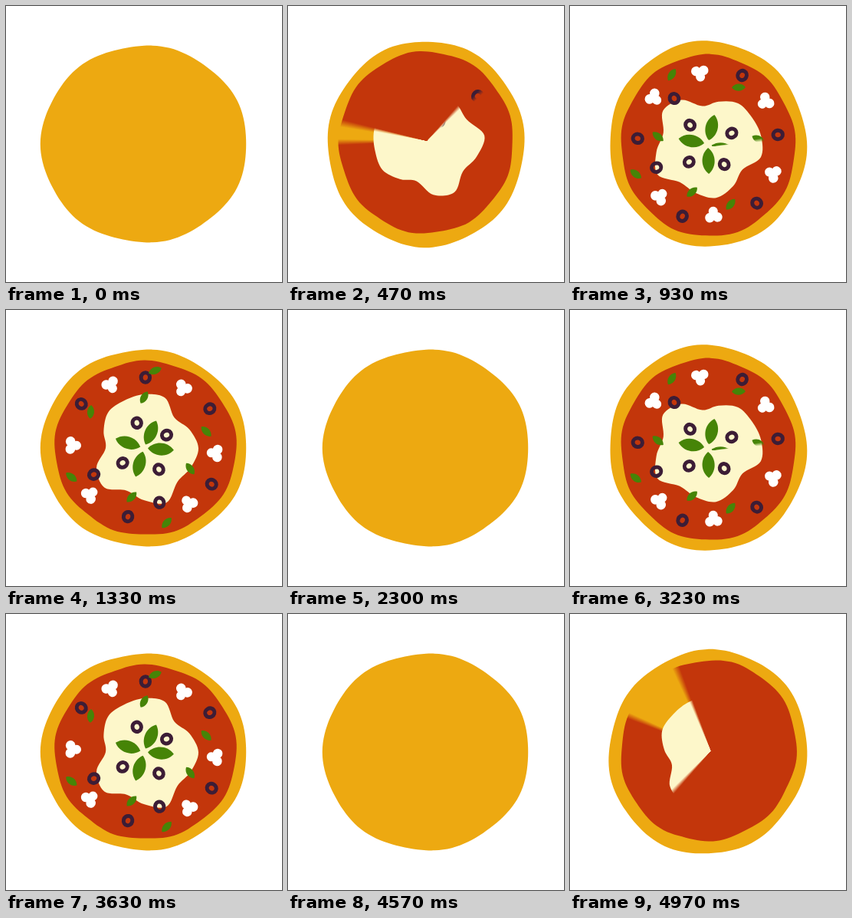
Write an HTML page that moves like this. It is 360x360 px and loops after 5000 ms.

```html
<!DOCTYPE html>
<html lang="en">
<head>
<meta charset="utf-8">
<title>Pizza</title>
<style>
  html, body { margin: 0; width: 100%; height: 100%; overflow: hidden; background: #fff; }
  svg { position: absolute; left: 0; top: 0; width: 360px; height: 360px; }
</style>
</head>
<body>
<script>
const { PI, sin, cos, exp, min, max, floor } = Math;

// Smooth closed shape around the centre, from evenly spaced radii
function blob(radii, fill) {
  const n = radii.length;
  const at = i => {
    const a = 2 * PI * i / n, r = radii[(i + n) % n];
    return [r * cos(a), r * sin(a)];
  };
  let d = `M${at(0)}`;
  for (let i = 0; i < n; i++) {
    const [a, b, c, e] = [-1, 0, 1, 2].map(k => at(i + k));
    d += `C${b.map((v, k) => v + (c[k] - a[k]) / 6)} ${c.map((v, k) => v - (e[k] - b[k]) / 6)} ${c}`;
  }
  return `<path d="${d}Z" fill="${fill}"/>`;
}

const wavy = radius => Array.from({ length: 72 }, (_, i) => radius(i * PI / 36));

// Repeats a topping at the given angles, turned to face outwards plus a tilt
const ring = (radius, angles, body, tilt = 0) => angles.map(a =>
  `<g transform="rotate(${a}) translate(${radius}) rotate(${tilt})">${body}</g>`).join('');

function leaf(length, width) {
  const l = length / 2, w = width * 0.67;
  return `<path d="M${-l} 0C${-l / 2} ${-w} ${l / 2} ${-w} ${l} 0C${l / 2} ${w} ${-l / 2} ${w} ${-l} 0Z" fill="#468407"/>`;
}

const olive = '<ellipse rx="6.2" ry="5.7" fill="none" stroke="#3c1d36" stroke-width="5"/>';
const mushroom = '<g fill="#fff"><circle cx="3" cy="-5" r="6.3"/><circle cx="3" cy="5" r="6.3"/><circle cx="-5" r="6"/></g>';
const sprig = leaf(18, 9);

const crust = blob(wavy(a => 131.2 + 3 * cos(2 * a) - cos(7 * a)), '#eda911');
const sauce = blob(wavy(a => 116 + 2 * cos(a) + 2.5 * cos(2 * a) - sin(9 * a)), '#c3360b');
const cheese = blob([71, 66, 62, 77, 68, 60, 73, 67, 50, 57, 66, 67, 70, 71, 56, 64], '#fdf7ca');
const olives = ring(34, [-106, -30, 55, 145], olive) + ring(74, [74, 152], olive)
  + ring(92, [-89, 103], olive) + ring(100, [-145, -31, 28], olive);
const mushrooms = ring(93, [-118, -57, 4, 51, 139, 182], mushroom);
const basil = ring(22, [-66, 4, 106, 198], leaf(34, 16)) + ring(66, [-90, 24, 104], sprig, 30)
  + ring(84, [-146, -15], sprig, 60) + ring(102, [-82, 73, 158], sprig, 60);

const layers = [crust, sauce, cheese, olives, mushrooms, basil].map(body => {
  document.body.insertAdjacentHTML('beforeend', `<svg viewBox="-180 -180 360 360">${body}</svg>`);
  return document.body.lastElementChild;
});

const clamp = v => min(1, max(0, v));
const STAGGER = 133;

// One full turn, eased in and out
const spin = t => 180 * (1 - cos(PI * clamp((t - 30) / 1320)));
// Degrees uncovered: a quick start and a long settle
const sweep = t => 360 * (1 - exp(-((max(0, t - 185) / 142) ** 1.75)));

// Soft-edged wedge, opened counterclockwise from the top
function wedge(open) {
  const gap = 360 - open;
  if (gap < 0.05) return 'none';
  const seam = clamp(1 - gap / 12);
  return `conic-gradient(at 184px 180px, #0000 ${gap - 5}deg, #000 ${gap}deg, #000 356deg, rgba(0,0,0,${seam}) 360deg)`;
}

function draw(ms) {
  // 30 pictures a second; the bake restarts twice and is cut short the last time
  const tick = floor((ms % 5000) * 0.03 + 0.15);
  const start = tick >= 137 ? 137 : tick >= 69 ? 69 : 0;
  const t = (tick - start) * 100 / 3;
  let angle = spin(t);
  layers.forEach((layer, i) => {
    const open = i ? sweep(t - (i - 1) * STAGGER) : 360;
    layer.style.transform = `rotate(${-angle}deg)`;
    layer.style.visibility = open > 0 ? 'visible' : 'hidden';
    layer.style.webkitMaskImage = wedge(open);
    angle += open - 360; // the next layer starts at this one's leading edge
  });
}

const begin = performance.now();
function loop() {
  draw(performance.now() - begin);
  requestAnimationFrame(loop);
}
loop();
</script>
</body>
</html>
```
